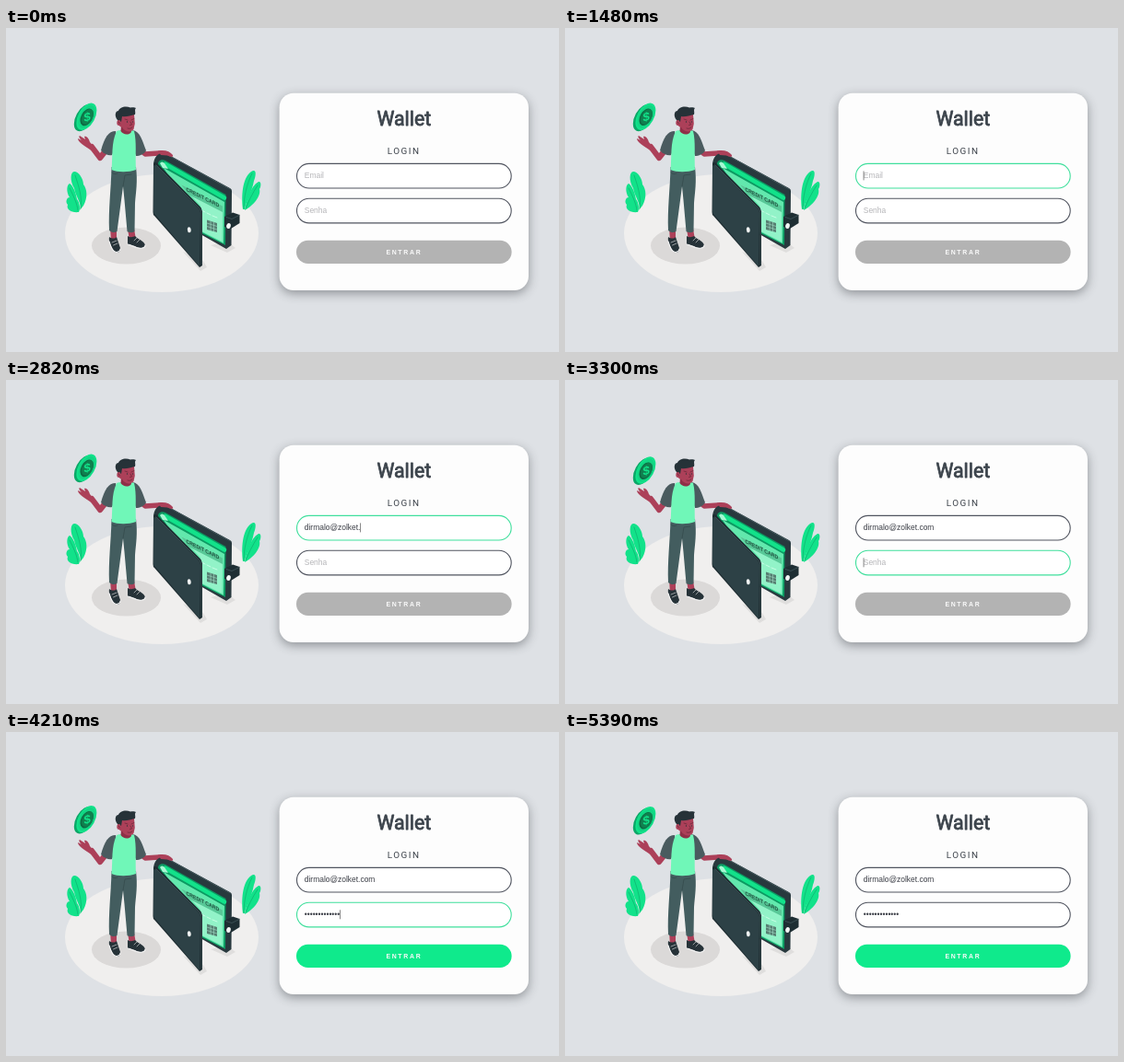
Recreate the animation shown at these times as an HTML page with a canvas. Size 600 px wide and 352 px high, loop 5.42 s.

```html
<!DOCTYPE html>
<html lang="pt">
<head>
<meta charset="utf-8">
<title>Wallet</title>
<style>
html, body { margin: 0; width: 100%; height: 100%; overflow: hidden; background: #dee1e5; }
canvas { display: block; width: 600px; height: 352px; }
</style>
</head>
<body>
<canvas id="stage"></canvas>
<script>
const W = 600, H = 352, LOOP = 5420;
const canvas = document.getElementById('stage');
const ctx = canvas.getContext('2d');
const ratio = window.devicePixelRatio || 1;
canvas.width = W * ratio;
canvas.height = H * ratio;

const SANS = '"Liberation Sans", Arial, sans-serif';
const ROBOTO = 'Roboto, sans-serif';
const SKIN = '#ac4059', SKIN_DARK = '#8e3048', DARK = '#263238', SLATE = '#4a5b5f';
const PANTS = '#435d5f', MINT = '#70f7b8', GREEN = '#12e28a', DEEP = '#0c9a62';

const EMAIL = 'dirmalo@zolket.com';
const PASS_LENGTH = 13;
const emailTyping = { start: 1650, step: 76 };
const passTyping = { start: 3524, step: 46 };
const focusEmail = 1300, focusPass = 3280, blur = 4900;
const enableAt = 3790, enableTime = 300;

const clamp = (v, lo, hi) => Math.min(hi, Math.max(lo, v));

function fill(d, color) {
  ctx.fillStyle = color;
  ctx.fill(new Path2D(d));
}

function line(d, color, width) {
  ctx.strokeStyle = color;
  ctx.lineWidth = width;
  ctx.lineCap = ctx.lineJoin = 'round';
  ctx.stroke(new Path2D(d));
}

function oval(x, y, rx, ry, color, turn = 0) {
  ctx.fillStyle = color;
  ctx.beginPath();
  ctx.ellipse(x, y, rx, ry, turn, 0, Math.PI * 2);
  ctx.fill();
}

function box(x, y, w, h, r) {
  ctx.beginPath();
  ctx.roundRect(x, y, w, h, r);
}

// Draws text and returns its width; weight adds an outline for a bolder look.
function text(str, x, y, font, color, { spacing = 0, center = false, weight = 0 } = {}) {
  ctx.font = font;
  ctx.letterSpacing = spacing + 'px';
  const width = ctx.measureText(str).width;
  const left = center ? x - (width - spacing) / 2 : x;
  ctx.fillStyle = ctx.strokeStyle = color;
  ctx.fillText(str, left, y);
  if (weight) {
    ctx.lineWidth = weight;
    ctx.strokeText(str, left, y);
  }
  ctx.letterSpacing = '0px';
  return width;
}

function drawPlants() {
  fill('M80 198C83 191 75 182 74 174C69 166 70 156 74 156C79 156 84 164 84 170C88 175 89 184 84 193Z', GREEN);
  fill('M79 200C71 201 65 197 67 192C64 189 66 184 69 184C65 178 66 170 69 169C73 171 76 180 77 186C80 190 81 196 79 200Z', GREEN);
  line('M75 160C79 172 83 184 81 196M69 174C73 182 77 190 78 198', DEEP, .5);
  fill('M257 197C255 180 257 160 268 155C272 154 271 161 269 166C267 178 261 186 259 197Z', GREEN);
  fill('M259 198C261 188 265 172 274 167C277 166 277 172 275 175C277 183 268 193 259 198Z', GREEN);
  line('M267 158C261 170 258 184 258 196M273 171C267 180 263 189 260 196', DEEP, .5);
}

function drawCoin(t) {
  const phase = (((t - 390) % 1500 + 1500) % 1500) / 1500;
  const lift = 4.4 * (1 - Math.abs(2 * phase - 1));
  ctx.save();
  ctx.translate(86.2, 99.2 - lift);
  oval(-1.4, .6, 9, 16, '#0ba868', .5);
  oval(1.2, -.6, 9, 16, GREEN, .5);
  oval(1.5, -.6, 7.8, 13.6, '#12d583', .5);
  oval(1.5, 0, 6.2, 10, '#0d6a43', .5);
  oval(2.3, -.5, 5.4, 9, '#10804f', .5);
  ctx.transform(1, -.25, 0, 1, 0, 0);
  text('$', 2, 4.6, `bold 13px ${SANS}`, GREEN, { center: true });
  ctx.restore();
}

function drawShoe(d, sole, laces) {
  fill(d, DARK);
  line(sole, '#f4f4f4', 1.1);
  line(laces, '#e6e6e6', .6);
}

function drawMan() {
  // legs and shoes
  fill('M113 217L120 217L120 231L114 231Z', SKIN);
  fill('M132 218L139 218L141 230L134 231Z', SKIN);
  drawShoe('M112 227C115 229 118 229 120 227L124 239C125 245 118 245 116 241C114 236 111 232 112 227Z',
    'M112 232C114 239 116 244 120 243.5C123 243 124 242 124 240', 'M115 233L120 231M116.5 236L121 234');
  drawShoe('M132 226C135 228 138 227 140 226C142 229 150 231 151 236C150 240 144 240 140 237L132 235Z',
    'M132 235C138 236 141 240 147 239.3C150 238.8 151 238 151 236', 'M139 231L142 228M142 233L145 230');
  fill('M114.500 151L141 151C143 167 141 178 140 190L139.500 221C137 223 133 222 131.500 221L128.500 187L127 172L120.500 221C118 223 114 222 112 220C111 197 114 175 114.500 151Z', PANTS);
  line('M127 172L129 160L136 159M115 157C117 159 119 159 121 158', '#304647', .6);

  // raised arm
  line('M110 131L102 141L93 129', SKIN, 6.2);
  fill('M97 131L91 124C90 120 87 117 85 118L86 121L80 117C78 118 81 121 82 122L78 120C78 123 83 127 88 130L94 134Z', SKIN);
  // resting arm
  line('M146 133L151 137L166 136', SKIN, 5.4);

  // torso
  fill('M119 112C111 112 107 119 103 133C106 137 112 139 115 138L121 126Z', SLATE);
  fill('M137 111C146 112 148 123 152 133C150 137 145 139 141 139L136 126Z', SLATE);
  fill('M120 112C126 110 134 110 139 112C142 124 140 138 141 154C133 157 121 157 114.500 154C116 139 114 125 120 112Z', MINT);
  fill('M125 106L135 109L136 113C133 117 127 116 124.500 112Z', SKIN_DARK);

  // head
  fill('M122 93C128 91 136 91 139 94L139.800 104L138.500 110C136 114 129 113 126 108C122 107 121 103 121.500 98Z', SKIN);
  fill('M121 100C117 95 119 90 122 90C123 86 130 84 135 86.500C137 86 140 86 141 87C139 89 141 91 140 94C135 95 130 97 126 96L125 102L123 102Z', DARK);
  oval(122.5, 103, 2.2, 3, SKIN);
  line('M122 102L123.500 104M129 99L132 100M136 100L139 98.500M132 109C134 110 136 109 137 108M135 102L136.500 105L134.500 105.500', '#5b2031', .6);
  oval(131.5, 102, .6, .8, DARK);
  oval(137.4, 102, .5, .8, DARK);
}

function drawWallet() {
  fill('M192 243L211 264L218 260L214 253Z', '#dfdedd');
  fill('M222 236L240 244L249 239L240 232Z', '#dfdedd');

  // back cover
  fill('M160 149C160 140 166 134.500 173 136L243 174Q245 175 245 177L244.500 236L239 240L211 224L170 180Z', '#28393e');
  line('M173 136.500L243 175', '#44585c', 1);
  // pocket
  fill('M165 150C164 145 168 142 173 144L238.500 181L238 236L212 223L190 190Z', DEEP);
  line('M173 148L237 184.500', GREEN, 4.6);
  fill('M171 152L237 189L236 234L211 221L176 160Z', '#62e8ad');
  fill('M167 147Q169 144 172 147L176 153L170 152Z', '#a5f8d3');

  // card
  fill('M190 170L235 194L234.500 232L211 220L211 193Z', '#92f3c8');
  fill('M190 170L235 193.500L235 200L198 181Z', '#58c797');
  ctx.save();
  ctx.transform(1, .5, 0, 1.15, 195.5, 177);
  text('CREDIT CARD', 0, 0, `bold 5.2px ${SANS}`, '#1d5540');
  ctx.restore();
  line('M212 198L216 200M218 201L222 203M224 204L229 206', '#c8ffe6', 1);
  fill('M218 208.500L229 212L229 222L218 219Z', '#567f72');
  line('M218 212L229 215.500M218 215.500L229 219M222 210L222 220M225.500 211L225.500 221', '#a0dcc4', .6);

  // strap
  fill('M237 205L246 200.500L253.500 203L253.500 212L244 218L237 216Z', '#1e2e33');
  line('M239 205.500L245 207.500L253 203.500', '#42575c', .8);
  oval(241.5, 215, 2.3, 3, '#f3f5f5', .2);

  // front cover
  fill('M160 149C160 145 163 145 166 149L211.500 195L213 199L213 258L210 260L161 204Q159.500 203 159.500 200Z', '#1d2c31');
  fill('M160 150Q161 148 164 150L209 196Q211 198 211 201L210 259L162 203Q160 202 160 199Z', '#2d4146');
  line('M163 149L210.500 196.500L212 200L212 257', '#46595e', .7);
  oval(198.8, 219.3, 1.9, 3, '#f3f5f5', -.1);
}

function drawField(y, value, hint, focused, caretOn) {
  box(315.5, y, 232.7, 26.6, 13.3);
  ctx.fillStyle = '#fff';
  ctx.fill();
  ctx.strokeStyle = focused ? '#3fdf9c' : '#50545f';
  ctx.lineWidth = 1.1;
  ctx.stroke();
  const base = y + 15.8;
  const font = `8.45px ${SANS}`;
  if (!value) text(hint, 323.8, base, font, '#b5b5b8');
  const width = value ? text(value, 323.8, base, font, '#3b3e46') : 0;
  if (focused && caretOn) {
    ctx.fillStyle = '#555';
    ctx.fillRect(323.7 + width, y + 8, .7, 10);
  }
}

const typedCount = (t, typing, max) =>
  clamp(Math.floor((t - typing.start) / typing.step), 0, max);

// The caret restarts its blink on focus and on every key.
function caretVisible(t, focus, typing, count) {
  const last = count ? typing.start + count * typing.step : focus;
  return Math.floor((t - last) / 500) % 2 === 0;
}

function drawCard(t) {
  ctx.save();
  ctx.shadowColor = 'rgba(50, 55, 60, .45)';
  ctx.shadowBlur = 11 * ratio;
  ctx.shadowOffsetY = 3.5 * ratio;
  box(296.6, 70.8, 270.4, 214.2, 15.5);
  ctx.fillStyle = '#fdfdfd';
  ctx.fill();
  ctx.restore();

  text('Wallet', 431.8, 105.8, `21.3px ${ROBOTO}`, '#3c444c', { center: true, weight: .8 });
  text('LOGIN', 430.9, 136.5, `9.9px ${ROBOTO}`, '#3c424a', { center: true, spacing: 1.5 });

  const chars = typedCount(t, emailTyping, EMAIL.length);
  const dots = typedCount(t, passTyping, PASS_LENGTH);
  drawField(147.4, EMAIL.slice(0, chars), 'Email', t >= focusEmail && t < focusPass,
    caretVisible(t, focusEmail, emailTyping, chars));
  drawField(185.3, '•'.repeat(dots), 'Senha', t >= focusPass && t < blur,
    caretVisible(t, focusPass, passTyping, dots));

  const k = clamp((t - enableAt) / enableTime, 0, 1);
  const mix = (a, b) => Math.round(a + (b - a) * k);
  box(315, 230.8, 233.6, 25.2, 12.6);
  ctx.fillStyle = `rgb(${mix(179, 15)}, ${mix(179, 234)}, ${mix(179, 140)})`;
  ctx.fill();
  text('ENTRAR', 431, 245.7, `bold 6.9px ${SANS}`, '#fafafa', { center: true, spacing: 1.7 });
}

function draw(t) {
  ctx.setTransform(ratio, 0, 0, ratio, 0, 0);
  ctx.fillStyle = '#dee1e5';
  ctx.fillRect(0, 0, W, H);
  oval(169, 223, 105, 64, '#f0efee');
  oval(130.5, 236.5, 37.5, 20, '#dbd9d8');
  drawPlants();
  drawMan();
  drawWallet();
  fill('M165 133.500C172 132 178 134 181 138C182 141 178 140 175 138.500L168 138Z', SKIN);
  drawCoin(t);
  drawCard(t);
}

const begin = performance.now();
function frame() {
  draw((performance.now() - begin) % LOOP);
  requestAnimationFrame(frame);
}
frame();
</script>
</body>
</html>
```
